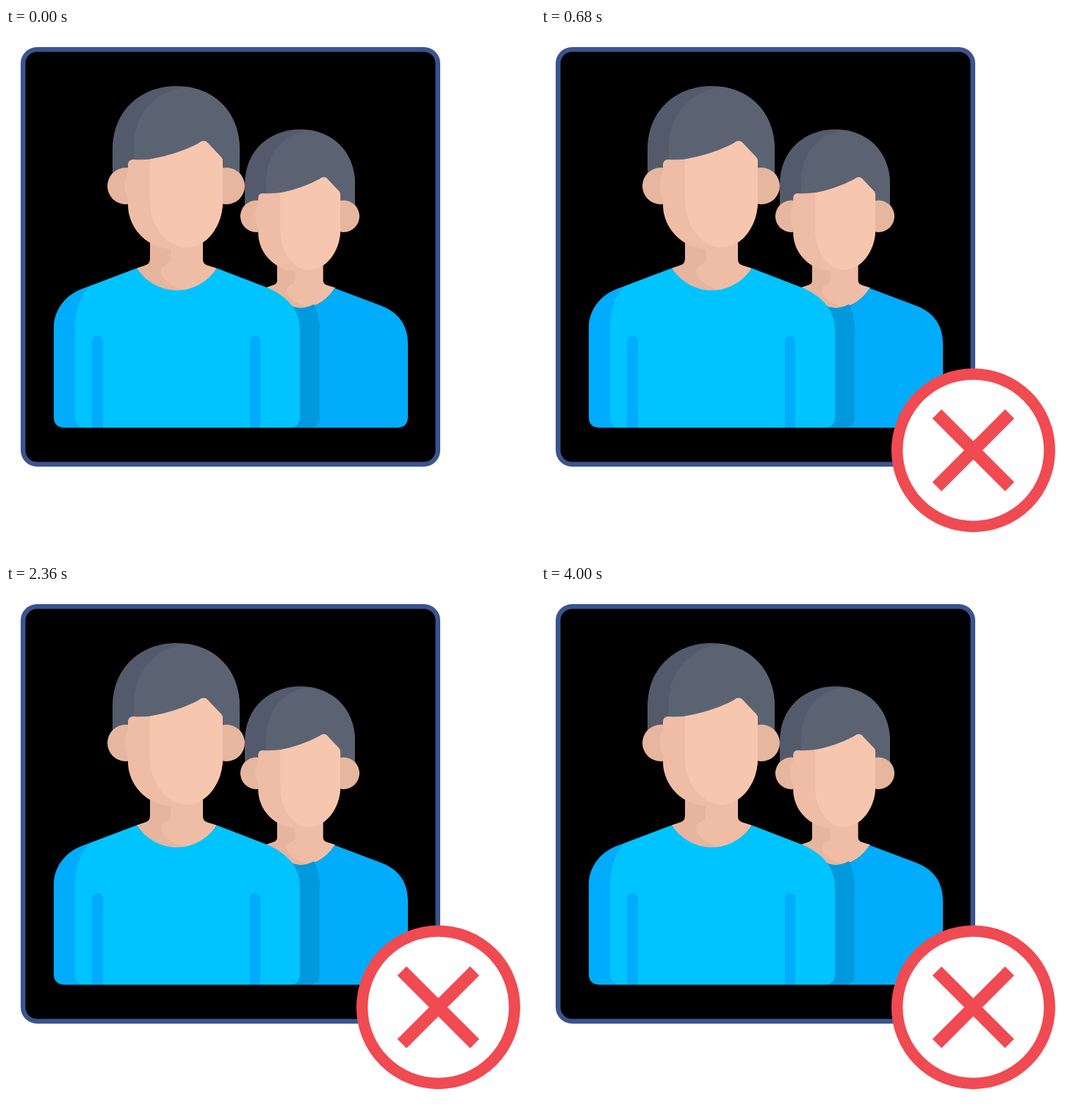
Write an HTML page that moves like this. It is 720x720 px and loops after 5000 ms.

```html
<!DOCTYPE html>
<html lang="en">
<head>
<meta charset="utf-8">
<title>Rejected users</title>
<style>
  html, body { margin: 0; width: 100%; height: 100%; overflow: hidden; background: #fff; }
  svg { display: block; width: 100%; height: 100%; }
</style>
</head>
<body>
<svg viewBox="0 0 720 720">
  <rect x="23.25" y="29.25" width="564.5" height="564.5" rx="19" fill="#000" stroke="#3a5490" stroke-width="6.5"/>

  <g id="backHead" transform="translate(199.3 69.4) scale(.867 .869)"></g>
  <path fill="#00acfb" d="M447 354L513 379C535 388 547 405 547 430V529Q547 544 532 544H370V381H403C422 381 437 370 447 354Z"/>
  <path fill="#0099dd" d="M385 376C396 383 408 382 419 376C424 385 427 397 427 411V529Q427 544 412 544H370Z"/>

  <g id="frontHead"></g>
  <path fill="#00acfb" d="M178 327L109 353C82 361 65 383 65 408V529Q65 544 80 544H130V353Z"/>
  <path fill="#00c4ff" d="M178 327C205 367 260 367 287 327L357 354C385 367 400 385 400 411V529Q400 544 385 544H109Q94 544 94 529V408C94 385 101 365 113 352Z"/>
  <path fill="#00acfb" d="M117 544V426.5a7.5 7.5 0 0 1 15 0V544ZM332 544V426.5a7 7.5 0 0 1 14 0V544Z"/>

  <g id="badge" stroke="#f04a52">
    <circle r="103.75" fill="#fff" stroke-width="15.5"/>
    <path id="cross" d="M-49.5-49.5L49.5 49.5M-49.5 49.5L49.5-49.5" stroke-width="17.5"/>
  </g>
</svg>
<script>
const $ = id => document.getElementById(id);

// Head and neck; shift moves the left edge of the lit areas.
const head = shift => {
  const hairX = 174 + shift, faceX = 196 + shift;
  return `
  <path fill="#efbda6" d="M196 270V315Q196 321 190 323L178 327C205 370 260 370 287 327L274 323Q268 321 268 315V270Z"/>
  <path fill="#e6b59d" d="M196 270V315Q196 321 190 323L178 327C196 354 218 359 242 357C224 350 211 342 211 331Q211 325 218 322Q224 320 224 315V270Z"/>
  <path fill="#535a6b" d="M145 200V165C145 112 184 79 232 79S318 112 318 165V200Z"/>
  <path fill="#5b6373" d="M${hairX} 200V160C${hairX} 118 204 85 246 80C290 86 318 120 318 165V200Z"/>
  <g fill="#e7b69e"><circle cx="163" cy="215" r="25"/><circle cx="300" cy="215" r="25"/></g>
  <path fill="#efbda6" d="M168 193Q155 215 168 237Z"/>
  <path fill="#efbda6" d="M166 187Q166 179 173 179C205 181 238 172 262 157Q270 150 276 158L293 176Q295 178 295 182V236C295 270 272 299 246 299Q238 301 228 301C194 301 166 274 166 240Z"/>
  <path fill="#f7c6af" d="M${faceX} 178.5Q233 172 262 157Q270 150 276 158L293 176Q295 178 295 182V236C295 270 272 299 246 299S${faceX} 270 ${faceX} 236Z"/>`;
};
$('frontHead').innerHTML = head(0);
$('backHead').innerHTML = head(4.6);

const ease = x => {
  x = Math.min(1, Math.max(0, x));
  return x * x * (3 - 2 * x);
};

const draw = now => {
  const t = Math.floor(now % 5000 / 40) * 40;
  const start = t < 1720 ? 0 : t < 3360 ? 1670 : 3340;
  const age = t - start;
  $('badge').setAttribute('transform', `translate(588.4 574.7) scale(${ease(age / 200)})`);
  $('cross').setAttribute('transform', `scale(${ease((age - 340) / 330)})`);
};

const loop = () => {
  draw(performance.now());
  requestAnimationFrame(loop);
};
loop();
</script>
</body>
</html>
```
